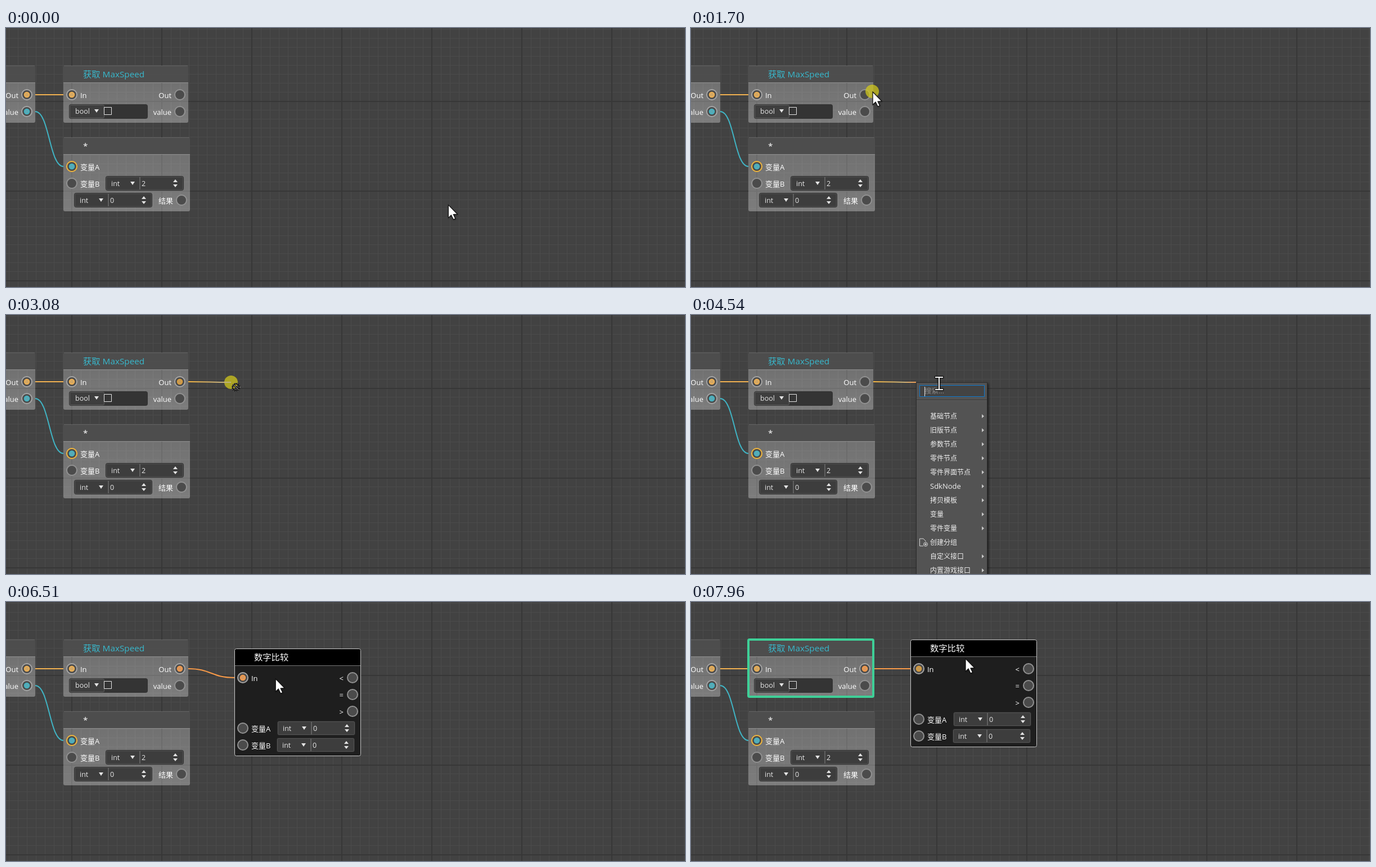
Animation of 1207x462 px, one loop 8000 ms. Source, as an HTML page with a canvas:

```html
<!DOCTYPE html>
<html lang="zh">
<head>
<meta charset="utf-8">
<style>
  html, body { margin: 0; width: 100%; height: 100%; overflow: hidden; background: #424242; }
  canvas { display: block; }
</style>
</head>
<body>
<canvas id="stage" width="1207" height="462"></canvas>
<script>
const W = 1207, H = 462, LOOP = 8000;
const ctx = document.getElementById('stage').getContext('2d');
const FONT = '"Open Sans", "Noto Sans CJK SC", "Noto Sans CJK", "Noto Sans", sans-serif';
const AMBER = '#f0b050', DIM_AMBER = '#dc9c38', ORANGE = '#f89a48', TEAL = '#40b4c4';

// Pointer path: time, x, y
const PATH = [
  [0, 787, 316], [350, 560, 190], [600, 420, 92], [760, 380, 107], [820, 380, 107],
  [1160, 315, 113], [1370, 323, 114], [1700, 323, 114], [2460, 383, 119],
  [2740, 391, 120], [2870, 391, 120], [3080, 401, 121], [3610, 401, 121],
  [3750, 441, 122], [4800, 441, 122], [4870, 441, 123], [6440, 441, 123],
  [6510, 479, 137], [6850, 545, 141], [7270, 504, 117], [7340, 504, 117], [7820, 488, 101]
];
const MENU = ['基础节点', '旧版节点', '参数节点', '零件节点', '零件界面节点', 'SdkNode',
  '拷贝模板', '变量', '零件变量', '创建分组', '自定义接口', '内置游戏接口'];
const RESULTS = ['数字比较', 'isalnum(是否至少有一个字符并且所有字符都是字母或数字)', 'isdigit(是否只包含数字)'];

const between = (t, a, b) => t >= a && t < b;

function pointerAt(t) {
  const i = PATH.findIndex(k => k[0] > t);
  if (i < 0) return PATH[PATH.length - 1].slice(1);
  const [t0, x0, y0] = PATH[i - 1], [t1, x1, y1] = PATH[i];
  const p = (t - t0) / (t1 - t0);
  return [x0 + (x1 - x0) * p, y0 + (y1 - y0) * p];
}

function rect(x, y, w, h, color) {
  ctx.fillStyle = color;
  ctx.fillRect(x, y, w, h);
}

function box(x, y, w, h, r, fill, stroke, line = 1) {
  ctx.beginPath();
  ctx.roundRect(x, y, w, h, r);
  if (fill) { ctx.fillStyle = fill; ctx.fill(); }
  if (stroke) { ctx.strokeStyle = stroke; ctx.lineWidth = line; ctx.stroke(); }
}

function disc(x, y, r, fill, stroke, line) {
  ctx.beginPath();
  ctx.arc(x, y, r, 0, Math.PI * 2);
  if (fill) { ctx.fillStyle = fill; ctx.fill(); }
  if (stroke) { ctx.strokeStyle = stroke; ctx.lineWidth = line; ctx.stroke(); }
}

function poly(points, fill) {
  ctx.beginPath();
  points.forEach(([x, y]) => ctx.lineTo(x, y));
  ctx.closePath();
  ctx.fillStyle = fill;
  ctx.fill();
}

function label(text, x, y, size = 13, color = '#fff', align = 'left') {
  ctx.font = `${size}px ${FONT}`;
  ctx.fillStyle = color;
  ctx.textAlign = align;
  ctx.fillText(text, x, y);
}

// Vertical triangle; dir 1 points down, -1 points up
function triangle(x, y, dir, half = 4, tall = 6) {
  poly([[x - half, y - dir * tall / 2], [x + half, y - dir * tall / 2], [x, y + dir * tall / 2]], '#e4e4e4');
}

function wire(x0, y0, x1, y1, color) {
  const mid = (x0 + x1) / 2;
  ctx.beginPath();
  ctx.moveTo(x0, y0);
  ctx.bezierCurveTo(mid, y0, mid, y1, x1, y1);
  ctx.strokeStyle = color;
  ctx.lineWidth = 2;
  ctx.stroke();
}

function port(x, y, dot, ring = dot ? '#a6a6a6' : '#929292') {
  disc(x, y, 9, '#4b4b4b', ring, 2);
  if (dot) {
    disc(x, y, 4.5, dot, dot, 1.5);
    disc(x, y, 3.5, 'rgba(150,150,150,.3)');
  }
}

function combo(x, y, text) {
  box(x + .5, y + .5, 61, 23, 2, '#3e3e3e', '#5e5e5e');
  label(text, x + 10, y + 16, 12.5, '#e6e6e6');
  triangle(x + 48, y + 11, 1);
}

function intField(x, y, value) {
  box(x + .5, y + .5, 138, 25, 3, '#3d3d3d', '#2b2b2b');
  box(x + 1.5, y + 1.5, 136, 23, 2, null, '#555');
  label('int', x + 10, y + 18, 12.5, '#e6e6e6');
  triangle(x + 48, y + 13, 1);
  rect(x + 60, y + 2, 2, 22, '#606060');
  label(value, x + 64, y + 18, 12.5, '#e6e6e6');
  triangle(x + 124, y + 8.5, -1, 4, 5);
  triangle(x + 124, y + 17.5, 1, 4, 5);
}

function node(x, y, w, h, title, color) {
  const body = ctx.createLinearGradient(0, y + 31, 0, y + h);
  body.addColorStop(0, 'rgba(255,255,255,.25)');
  body.addColorStop(1, 'rgba(255,255,255,.31)');
  box(x, y + 30, w, h - 30, [0, 0, 3, 3], body);
  box(x, y, w, 30, [3, 3, 0, 0], 'rgba(78,78,78,.95)');
  rect(x + 1, y, w - 2, 1, '#626262');
  rect(x, y + 30, w, 1, '#8c8c8c');
  label(title, x + 35, y + 21, 15.3, color);
}

function grid() {
  rect(0, 0, W, H, '#424242');
  for (let x = 5; x < W; x += 16) rect(x, 0, 1, H, '#4b4b4b');
  for (let y = 2; y < H; y += 16) rect(0, y, W, 1, '#4b4b4b');
  for (let x = 117; x < W; x += 160) rect(x - 1, 0, 2, H, '#373737');
  for (let y = 130; y < H; y += 160) rect(0, y, W, 2, '#373737');
}

function fixedNodes(outDot) {
  node(-170, 67, 222, 102, '');
  label('Out', 22, 125, 13, '#fff', 'right');
  label('value', 22, 155, 13, '#fff', 'right');
  port(37, 119, AMBER);
  port(37, 149, TEAL);

  node(102, 67, 222, 102, '获取 MaxSpeed', '#38b8cc');
  port(117, 119, AMBER);
  port(309, 119, outDot);
  port(309, 149);
  label('In', 132, 125);
  label('Out', 294, 125, 13, '#fff', 'right');
  label('value', 294, 155, 13, '#fff', 'right');
  box(112, 136, 140, 26, 4, '#343434');
  combo(113, 137, 'bool');
  box(174.5, 141.5, 13, 13, 0, null, '#e6e6e6');

  node(102, 195, 225, 132, '*', '#fff');
  port(117, 247, TEAL, '#f3b73c');
  port(117, 277);
  port(312, 307);
  label('变量A', 132, 253);
  label('变量B', 132, 283);
  label('结果', 297, 313, 13, '#fff', 'right');
  intField(177, 264, '2');
  intField(121, 294, '0');
}

function compareNode(x, y, inDot) {
  box(x + .5, y + .5, 224, 191, 3, '#1e1e1e');
  box(x + .5, y + .5, 224, 30, [3, 3, 0, 0], '#000');
  rect(x + 1, y + 30, 223, 1, '#777');
  box(x + .5, y + .5, 224, 191, 3, null, '#c4c4c4');
  label('数字比较', x + 35, y + 21, 15.3);
  port(x + 15, y + 52, inDot);
  label('In', x + 30, y + 58);
  ['<', '=', '>'].forEach((sign, i) => {
    port(x + 210, y + 52 + 30 * i);
    label(sign, x + 194, y + 58 + 30 * i, 13, '#fff', 'right');
  });
  ['变量A', '变量B'].forEach((name, i) => {
    port(x + 15, y + 142 + 30 * i);
    label(name, x + 30, y + 148 + 30 * i);
    intField(x + 76 - i, y + 129 + 30 * i, '0');
  });
}

function pageIcon(x, y, filled) {
  ctx.beginPath();
  [[11, 5], [11, 4], [7, 0], [.5, 0], [.5, 13], [7, 13]].forEach(([a, b]) => ctx.lineTo(x + a, y + b));
  if (filled) { ctx.closePath(); ctx.fillStyle = '#c9dce4'; ctx.fill(); }
  else { ctx.strokeStyle = '#d8d8d8'; ctx.lineWidth = 1; ctx.stroke(); }
  disc(x + 11, y + 10, 3.5, filled ? '#6ea82c' : null, filled ? null : '#d8d8d8', 1);
  rect(x + 9, y + 9.5, 4, 1, '#eee');
  rect(x + 10.5, y + 8, 1, 4, '#eee');
}

function menuFrame(w, h) {
  ctx.save();
  ctx.shadowColor = 'rgba(0,0,0,.6)';
  ctx.shadowBlur = 4;
  ctx.shadowOffsetX = ctx.shadowOffsetY = 2;
  rect(400, 120, w, h, '#2c2c2c');
  ctx.restore();
  rect(401, 121, w - 2, h - 2, '#535353');
  box(406.5, 125.5, w - 12, 20, 0, '#434343', '#0a78d0');
}

function fullMenu(caret) {
  menuFrame(127, 400);
  label('搜索...', 415, 140, 12.5, '#8c8c8c');
  if (caret) rect(415, 128, 1, 17, '#e8e8e8');
  rect(401, 151, 125, 1, '#343434');
  rect(401, 152, 125, 1, '#626262');
  MENU.forEach((name, i) => {
    const y = 180 + 25 * i;
    label(name, 425, y + 5, name === 'SdkNode' ? 13 : 12, '#f0f0f0');
    if (i === 9) pageIcon(406, y + 18 - 25 + 1, false);
    else poly([[517, y - 3], [521, y + .5], [517, y + 4]], '#c8c8c8');
  });
}

function resultMenu(selected) {
  menuFrame(372, 107);
  label('数字', 415, 140, 12.3, '#f0f0f0');
  if (!selected) rect(440, 128, 1, 17, '#e8e8e8');
  if (selected) rect(401, 151, 370, 25, '#006ee8');
  RESULTS.forEach((name, i) => {
    pageIcon(406, 156 + 25 * i, i > 0);
    label(name, 425, 168 + 25 * i, 12, '#f4f4f4');
  });
}

function arrow(x, y) {
  ctx.save();
  ctx.translate(x, y);
  ctx.shadowColor = 'rgba(0,0,0,.55)';
  ctx.shadowBlur = 3;
  ctx.shadowOffsetX = ctx.shadowOffsetY = 1;
  poly([[0, 0], [0, 23], [5, 18], [9, 26], [12.5, 24.5], [9, 17], [16, 16.5]], '#fff');
  ctx.shadowColor = 'transparent';
  ctx.strokeStyle = '#111';
  ctx.lineWidth = 1.2;
  ctx.stroke();
  ctx.restore();
}

function beam(x, y) {
  for (const [color, width] of [['#111', 4.5], ['#f4f4f4', 2]]) {
    ctx.beginPath();
    for (const end of [-11, 11]) {
      ctx.moveTo(x - 6, y + end);
      ctx.lineTo(x + 6, y + end);
    }
    ctx.moveTo(x, y - 11);
    ctx.lineTo(x, y + 11);
    ctx.strokeStyle = color;
    ctx.lineWidth = width;
    ctx.lineCap = 'square';
    ctx.stroke();
  }
  ctx.lineCap = 'butt';
}

function forbidden(x, y) {
  disc(x, y, 6.5, null, '#0c0c0c', 2.5);
  ctx.setLineDash([1.5, 2]);
  disc(x, y, 7, null, '#c8c8c8', 1);
  ctx.setLineDash([]);
  for (const [color, width] of [['#0c0c0c', 3], ['#c8c8c8', 1]]) {
    ctx.beginPath();
    ctx.moveTo(x - 4.5, y - 4.5);
    ctx.lineTo(x + 4.5, y + 4.5);
    ctx.strokeStyle = color;
    ctx.lineWidth = width;
    ctx.stroke();
  }
}

function looseWire(t) {
  const [x, y] = pointerAt(Math.min(t, 3500));
  const color = ctx.createLinearGradient(324, 0, 401, 0);
  color.addColorStop(0, '#f4b440');
  color.addColorStop(.7, '#c8b078');
  color.addColorStop(1, t < 3610 ? '#b8b080' : '#f09a50');
  if (x > 325) wire(324, 119, x - 1, y - 1, color);
}

function draw(t) {
  const [x, y] = pointerAt(t);
  const linking = between(t, 1770, 3610), linked = t >= 5790;
  const dragging = between(t, 1770, 3410);

  grid();
  wire(52, 119, 102, 119, AMBER);
  wire(52, 149, 102, 247, TEAL);
  fixedNodes(linking ? DIM_AMBER : linked ? ORANGE : null);

  if (linked) {
    // The dragged node snaps to the 16 px grid
    const snap = v => t < 7340 ? 0 : Math.round(v / 16) * 16;
    const nx = 406 + snap(x - 504), ny = 83 + snap(y - 117);
    wire(324, 119, nx, ny + 52, ORANGE);
    compareNode(nx, ny, nx < 406 ? DIM_AMBER : ORANGE);
    if (t >= 7820) box(102, 67, 222, 102, 2, null, '#3ecf97', 4);
  }

  if (between(t, 1700, 3210) || between(t, 7340, 7820)) disc(x - 1, y - 1, 12, 'rgba(214,204,26,.72)');
  if (between(t, 1770, 5790)) looseWire(t);
  if (between(t, 3610, 4800)) fullMenu(!between(t, 4080, 4540));
  if (between(t, 4800, 5530)) resultMenu(t >= 5400);

  if (dragging) forbidden(x + 8, y + 8);
  else if (between(t, 3750, 4870)) beam(x, y);
  else arrow(x, y);
}

function tick() {
  draw(performance.now() % LOOP);
  requestAnimationFrame(tick);
}
tick();
</script>
</body>
</html>
```
